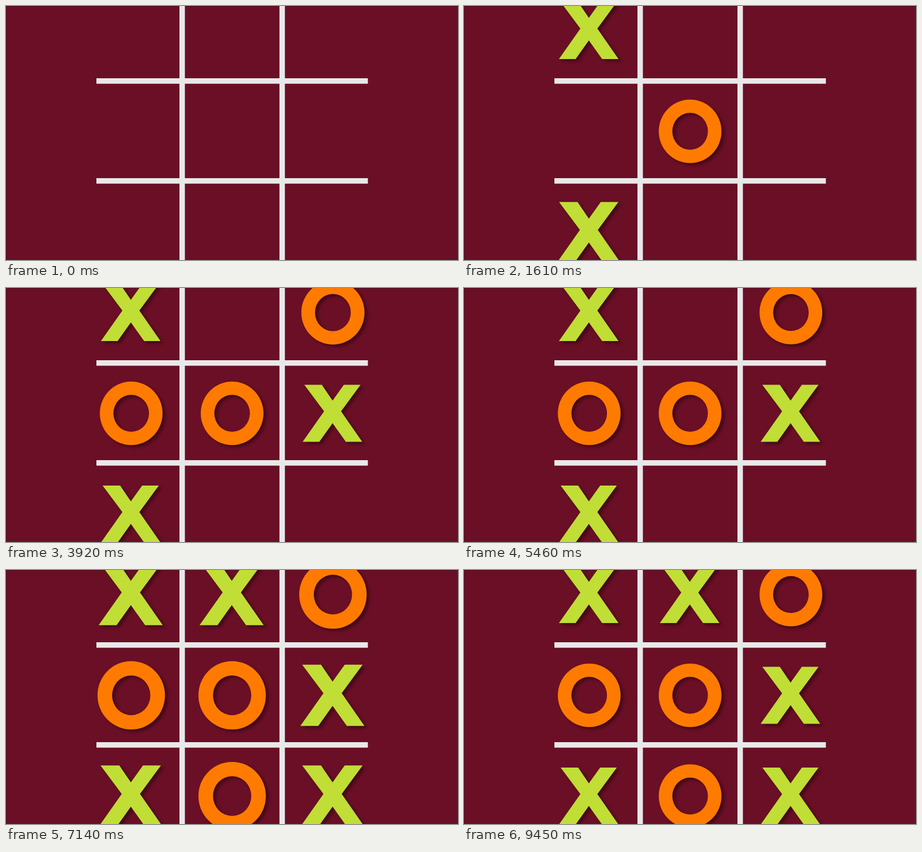
These frames come from a looping animation (800 px wide and 450 px high, 9520 ms). An HTML page with a canvas:

```html
<!DOCTYPE html>
<html lang="en">
<head>
<meta charset="utf-8">
<title>Noughts and crosses</title>
<style>
html, body { margin: 0; width: 100%; height: 100%; overflow: hidden; background: #6a0f26; }
canvas { display: block; }
</style>
</head>
<body>
<canvas id="stage" width="800" height="450"></canvas>
<script>
const ctx = document.getElementById('stage').getContext('2d');
const LOOP = 9520, STEP = 70;
const COLS = [221, 399.6, 578], ROWS = [43.5, 222, 400.5];

// Moves in playing order: mark, column, row, start time.
const MOVES = [
  ['X', 0, 0, 100], ['O', 1, 1, 700], ['X', 0, 2, 1365],
  ['O', 0, 1, 2100], ['X', 2, 1, 2835], ['O', 2, 0, 3640],
  ['X', 1, 0, 5480], ['O', 1, 2, 6000], ['X', 2, 2, 6500]
];

const CROSS = [
  [-50, -50.5], [-19, -50.5], [0, -22.5], [20, -50.5], [49.5, -50.5], [15, -3.5],
  [52.5, 50.5], [23.5, 50.5], [0, 17.5], [-23.5, 50.5], [-53, 50.5], [-15, -3.5]
];

// Grow past full size, then settle.
function popScale(age) {
  if (age <= 0) return 0;
  if (age < 140) return 1.2 * Math.sin(age / 140 * Math.PI / 2);
  return Math.max(1, 1.2 - 0.2 * (age - 140) / 145);
}

function pulseScale(t) {
  const p = (t - 7000) / 420;
  return p > 0 && p < 1 ? 1 + 0.087 * Math.sin(p * Math.PI) : 1;
}

function drawMark(mark, col, row, scale) {
  ctx.save();
  ctx.translate(COLS[col], ROWS[row]);
  ctx.scale(scale, scale);
  ctx.shadowColor = 'rgba(20, 0, 8, 0.42)';
  ctx.shadowBlur = 5;
  ctx.shadowOffsetX = 5;
  ctx.shadowOffsetY = 4;
  ctx.beginPath();
  if (mark === 'X') {
    CROSS.forEach(([x, y]) => ctx.lineTo(x, y));
    ctx.closePath();
    ctx.fillStyle = '#c0de35';
  } else {
    ctx.ellipse(0.6, 0, 55.5, 56.3, 0, 0, Math.PI * 2);
    ctx.moveTo(32.1, 0);
    ctx.ellipse(0.6, 0, 31.5, 32.8, 0, 0, Math.PI * 2);
    ctx.fillStyle = '#ff7b00';
  }
  ctx.fill('evenodd');
  ctx.restore();
}

function drawBoard() {
  ctx.fillStyle = '#6a0f26';
  ctx.fillRect(0, 0, 800, 450);
  ctx.fillStyle = 'rgba(0, 0, 0, 0.3)';
  ctx.fillRect(0, 0, 800, 1);
  ctx.fillRect(0, 1, 1, 449);
  ctx.fillStyle = '#e9e8e9';
  for (const x of [307, 484]) ctx.fillRect(x, 0, 9.6, 450);
  for (const y of [128, 305]) ctx.fillRect(160, y, 480.5, 9.7);
}

function draw(t) {
  drawBoard();
  const pulse = pulseScale(t);
  for (const [mark, col, row, start] of MOVES) {
    const scale = popScale(t - start) * pulse;
    if (scale > 0) drawMark(mark, col, row, scale);
  }
}

const origin = performance.now();
function tick() {
  const t = (performance.now() - origin) % LOOP;
  draw(t < 2 * STEP ? 0 : Math.floor(t / STEP) * STEP);
  requestAnimationFrame(tick);
}
tick();
</script>
</body>
</html>
```
